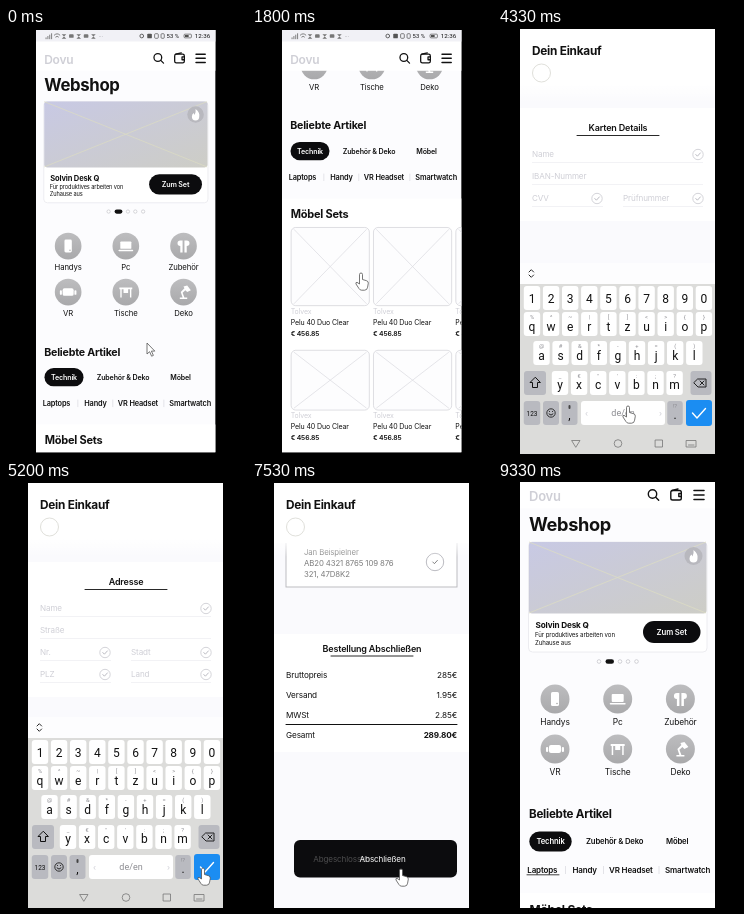
Animation of 240 by 426 pixels, one loop 9.39 s. Source, as an HTML page:

```html
<!DOCTYPE html>
<html lang="de">
<head>
<meta charset="utf-8">
<title>Webshop</title>
<style>
html, body { margin: 0; width: 100%; height: 100%; overflow: hidden; background: #000; }
svg { display: block; width: 240px; height: 426px; }
text { font-family: Inter, sans-serif; font-weight: 400; letter-spacing: -.015em; fill: #111; white-space: pre; }
.b { font-weight: 700; letter-spacing: -.02em; }
.s { font-weight: 600; letter-spacing: -.02em; }
.k { font-family: Roboto, sans-serif; letter-spacing: 0; }
.m { text-anchor: middle; }
.e { text-anchor: end; }
.w { fill: #fff; }
.g { fill: #cfcfd6; }
.d { fill: #8d8d92; }
.ln { fill: none; stroke: #111; stroke-width: 1.4; stroke-linecap: round; stroke-linejoin: round; }
.thin { fill: none; stroke: #dcdce2; stroke-width: .8; }
.ic { fill: #fff; stroke: none; }
</style>
</head>
<body>
<svg id="stage" viewBox="0 0 240 426">
  <defs>
    <clipPath id="phone"><rect x="22" y="-17.8" width="195" height="459"/></clipPath>
    <clipPath id="page"><rect x="22" y="1" width="195" height="425"/></clipPath>
    <linearGradient id="photo" x2="1" y2="1">
      <stop stop-color="#c8c9e4"/><stop offset="1" stop-color="#cdcdc6"/>
    </linearGradient>
    <linearGradient id="disc" x2="0" y2="1">
      <stop stop-color="#bdbdbf"/><stop offset="1" stop-color="#a9a9ab"/>
    </linearGradient>
    <linearGradient id="fade" x2="0" y2="1">
      <stop stop-color="#fff"/><stop offset=".75" stop-color="#fff"/>
      <stop offset="1" stop-color="#fff" stop-opacity="0"/>
    </linearGradient>
  </defs>
</svg>
<script>
const LOOP = 9390;
const stage = document.getElementById('stage');
const esc = s => s.replace(/&/g, '&amp;').replace(/</g, '&lt;');

// Drawing helpers
const T = (x, y, size, s, cls = '', more = '') =>
  `<text x="${x}" y="${y}" font-size="${size}" class="${cls}" ${more}>${esc(s)}</text>`;
const R = (x, y, w, h, fill, r = 0, more = '') =>
  `<rect x="${x}" y="${y}" width="${w}" height="${h}" rx="${r}" fill="${fill}" ${more}/>`;
const C = (x, y, r, fill, more = '') => `<circle cx="${x}" cy="${y}" r="${r}" fill="${fill}" ${more}/>`;
const P = (d, cls = 'ln', more = '') => `<path d="${d}" class="${cls}" ${more}/>`;
const G = (id, body, more = '') => `<g id="${id}" ${more}>${body}</g>`;
const at = (x, y, body) => `<g transform="translate(${x} ${y})">${body}</g>`;
const cross = (x, y, w, h) => P(`M${x} ${y}l${w} ${h}M${x} ${y + h}l${w} ${-h}`, 'thin');
const tick = (x, y, color) => P(`M${x - 2.2} ${y}l1.6 1.7 3-3.3`, 'ln', `style="stroke:${color};stroke-width:.9"`);

const statusBar = R(22, -7, 196, 13, '#f1f1f6') +
  P('M33 3v-1M35 3v-2.5M37 3v-4M39 3v-5.5M42-1q3-3 6 0M43.5 1q1.5-1.6 3 0', 'ln', 'style="stroke:#666;stroke-width:.9"') +
  [52, 60, 68, 76, 84].map((x, i) =>
    i % 2 ? R(x - 2, -2, 5, 4, '#777', 1) : P(`M${x - 2}-2h5l-2.5 2.5 2.5 2.5h-5l2.5-2.5z`, '', 'fill="#777"')).join('') +
  T(90, 2, 6, '···', 'd') +
  C(137, 0, 2, 'none', 'stroke="#555"') + R(143, -2.5, 5, 5, '#555', 1) +
  R(151, -2.5, 4, 5, 'none', 1, 'stroke="#555" stroke-width=".8"') +
  R(158, -2.5, 3.5, 5, 'none', 1, 'stroke="#555" stroke-width=".8"') +
  T(164, 2.3, 6.4, '53 %', 'k') + R(183, -2, 8, 4, 'none', 1, 'stroke="#444" stroke-width=".7"') +
  R(184, -1, 4, 2, '#444') + T(211.5, 2.3, 6.8, '12:36', 'k e');

// Home
const icons = [
  R(-4, -7, 8, 14, '#fff', 1.6) + C(2, 4.5, .8, '#aaa'),
  R(-6, -5, 12, 8, '#fff', 1) + R(-8, 4, 16, 1.6, '#fff', .8),
  P('M-1-6h-2.5a3 3 0 0 0 0 6v7H-1zM1-6h2.5a3 3 0 0 1 0 6v7H1z', 'ic'),
  R(-6, -4, 12, 8, '#fff', 2) + R(-9, -2, 2.2, 5, '#fff', 1) + R(6.8, -2, 2.2, 5, '#fff', 1),
  P('M-7-5H7v2H6v9H4.5v-9H2.5V1H-2.5v-4H-4.5v9H-6v-9H-7z', 'ic'),
  P('M-4 6h8v1.5h-8zM-1 6l-2-6 4-4-1-2 4-1 4 5-4 2-2-2-3 2.7L1 6z', 'ic')
];
const category = (name, i) => {
  const x = 57 + 62.7 * (i % 3), y = 217 + 50 * Math.floor(i / 3);
  return at(x, y, C(0, 0, 14.5, 'url(#disc)') + icons[i] + T(0, 26, 8.4, name, 'm'));
};
const article = (x, y, h, label) => R(x, y, 85, h, '#fdfdfe', 5, 'stroke="#d2d2d8" stroke-width=".8"') +
  cross(x + 3, y + 2, 79, h - 4) +
  T(x - .5, label, 7.6, 'Tolvex', 'g') + T(x - .5, label + 12, 7.6, 'Pelu 40 Duo Clear') +
  T(x - .5, label + 24, 7.4, '€ 456.85', 's');

const home = R(22, -18, 196, 460, '#fcfcfe') + G('feed',
  T(31, 48.5, 18.2, 'Webshop', 'b') +
  R(30.5, 60, 178.5, 110, '#fff', 4, 'stroke="#ececf0"') +
  R(31, 60, 177.5, 71.5, 'url(#photo)', 3) +
  P('M31 131L208 60M31 60l177 71', 'thin', 'style="stroke:#dcdcc4"') +
  C(195.5, 74, 9, '#b8b8be') +
  P('M195.5 68q5 4 4 8.5a4 4 0 0 1-8 0q0-2.5 2-4l1 2q1.6-3 1-6.5z', 'ic') +
  T(37.5, 146, 8.2, 'Solvin Desk Q', 'b') +
  T(37, 155, 6.1, 'Für produktives arbeiten von') + T(37, 163, 6.1, 'Zuhause aus') +
  R(145, 139, 57.5, 22, '#0c0c0e', 11) + T(173.7, 153, 7.8, 'Zum Set', 's w m') +
  [101, 122, 130, 138.5].map(x => C(x, 179.5, 1.8, '#fff', 'stroke="#c6c6cc" stroke-width=".8"')).join('') +
  R(107.5, 177.2, 8.5, 4.6, '#111', 2.3) +
  ['Handys', 'Pc', 'Zubehör', 'VR', 'Tische', 'Deko'].map(category).join('') +
  T(31, 336, 11.6, 'Beliebte Artikel', 'b') +
  R(31.3, 349.5, 42.4, 20, '#0c0c0e', 10) + T(52.5, 362.3, 7.7, 'Technik', 's w m') +
  T(88, 362.3, 7.7, 'Zubehör & Deko', 's') + T(168, 362.3, 7.7, 'Möbel', 's') +
  [['Laptops', 29.3], ['Handy', 74.5], ['VR Headset', 111], ['Smartwatch', 167]]
    .map(([s, x]) => T(x, 390.6, 8, s, 's')).join('') +
  P('M67.5 384v8M105.5 384v8M161 384v8', 'thin') +
  P('M29 392.8h32', 'ln', 'id="under" style="stroke-width:.8"') +
  R(22, 411, 196, 320, '#fff') +
  T(31.5, 432, 12, 'Möbel Sets', 'b') +
  [32, 121.5, 211].map(x => article(x, 442.5, 85, 536.5) + article(x, 576, 65, 649.6)).join('')
) +
  R(22, -18, 196, 44.5, '#fff') + at(0, -11.3, statusBar) +
  T(31, 18.7, 13, 'Dovu', 's g') +
  C(154.5, 12, 4.2, 'none', 'class="ln"') + P('M157.7 15.2l3 3') +
  R(172.8, 8.5, 10.5, 9.5, 'none', 1.8, 'class="ln"') + P('M174 8.5l6-1.5M183.3 11.5h-2.5v3h2.5') +
  P('M196 8.5h10M196 13h10M196 17.5h10', 'ln', 'style="stroke-width:1.6"');

// Product
const feature = (x, y) => C(x, y, 9.6, '#fff', 'stroke="#e2e2e8" stroke-width=".8"') + C(x, y, 5.5, '#cacad2') +
  R(x + 18, y - 5, 54, 10, '#cecdd5', 5);
const product = R(22, 1, 196, 423, '#fafafd') + R(22, 187, 196, 139, '#fff') +
  cross(22, 40, 196, 147) + R(22, 1, 196, 42, '#fff') + at(0, 8, statusBar) +
  P('M40 24.5l-4.5 4.5 4.5 4.5') + T(120, 35, 12, 'Produkt', 'b m') +
  P('M189.5 25.5h12.5v9h-12.5zM192.5 25.5q0-4 3.3-4t3.3 4') +
  R(168, 46, 40, 15, '#d0d0dc', 7.5) + R(176, 49.5, 25, 8, '#c3c3cb', 4, 'stroke="#f2f2f6"') +
  C(196, 169.5, 12.5, '#0c0c0e') + T(196, 172.5, 8, 'AR', 'w m') +
  T(31, 207, 7.6, 'Tolvex', 'g') +
  T(31, 223.3, 12, 'Tolvex Pelu', 'b') + T(31, 240.5, 12, '50 Duo Clear', 'b') +
  C(155, 214.5, 7.5, '#b9861a') + C(178, 214.5, 7.5, '#0c0d42') +
  C(201, 214.5, 7.5, '#e8f5fc', 'stroke="#cfdde6" stroke-width=".7"') +
  feature(40, 262) + feature(137, 262) + feature(40, 285) + feature(40, 308) +
  T(209, 295, 8.2, 'Preis', 'e') + T(209, 313, 17, '€ 285.00', 'b e') +
  R(22, 340, 196, 48, '#fff') + T(31, 358, 11.6, 'Dazu passt...', 'b') +
  [31.5, 121.5, 211].map(x => R(x, 367, 85.5, 86, '#fdfdfe', 5, 'stroke="#d2d2d8" stroke-width=".8"') +
    cross(x + 3, 369, 79, 82)).join('') +
  R(22, 387, 63, 37, '#fff') + R(85, 387, 133, 37, '#0c0c0e') + R(22, 424, 196, 2, '#000') +
  P('M22 387h63', 'ln', 'style="stroke-width:.6"') +
  T(53.5, 409, 7.5, 'Beratung', 'b m') + T(150, 409, 7.7, 'In den Warenkorb', 'w m');

// Checkout forms: x, y, hint, value, typing start, tick x
const fields = {
  card: [
    [34, 129, 'Name', 'Jan Beispielner', 4400, 200],
    [34, 151, 'IBAN-Nummer', 'AB20 4321 8765 109 876', 4540, 0],
    [34, 173, 'CVV', '321', 4700, 99],
    [125, 173, 'Prüfnummer', '47D8K2', 4800, 200]
  ],
  address: [
    [34, 129, 'Name', 'Jan Beispielner', 5270, 200],
    [34, 151, 'Straße', 'Beispielweg', 5400, 0],
    [34, 173, 'Nr.', '7b', 5530, 99],
    [125, 173, 'Stadt', 'Beispielort', 5600, 200],
    [34, 195, 'PLZ', '54321', 5730, 99],
    [125, 195, 'Land', 'Probeland', 5800, 200]
  ]
};
const checkoutHead = R(22, 1, 196, 74, 'url(#fade)') + T(34, 27, 11.8, 'Dein Einkauf', 'b') +
  C(43.5, 45, 9, '#fff', 'stroke="#dcdcd6" stroke-width=".9"');
const heading = (y, s) => T(120, y, 9, s, 's m') + P(`M79 ${y + 4.5}h82`, 'ln', 'style="stroke-width:.9"');
const form = (name, title, h) => G(name,
  R(22, 1, 196, 425, '#fafafd') + R(22, 80, 196, h, '#fff') + checkoutHead + heading(103, title) +
  fields[name].map(([x, y, , , , mark], i) =>
    P(`M${x} ${y + 5.5}H${mark === 99 ? 105 : 205}`, 'thin', 'style="stroke:#efeff3"') +
    T(x, y, 8.1, '', '', `id="${name}${i}"`) +
    (mark ? G(name + i + 'mark', C(mark, y - 2.5, 5.2, '#fff', 'stroke="#c9c9d0" stroke-width=".8"') +
      tick(mark, y - 2.5, '#b4b4bc')) : '')).join(''), 'clip-path="url(#page)"');

// Keyboard
const key = (x, y, w, fill, s = '', hint = '', drop = 6) =>
  R(x - w / 2, y - 12, w, 24, fill, 3) + T(x, y + drop, 12, s, 'k m') + T(x, y - 5, 5.8, hint, 'k m d');
const keyRow = (chars, hints, x, y, drop) =>
  [...chars].map((c, i) => key(x + 19.1 * i, y, 16.4, '#fff', c, hints[i], drop)).join('');
const GREY = '#b9bac0';
const keyboard =
  R(22, 235, 196, 21, '#fdfdfe') + P('M31 244l2.3-2.3 2.3 2.3M31 247l2.3 2.3 2.3-2.3', 'ln', 'style="stroke-width:.9"') +
  R(22, 256, 196, 170, '#dcdcda') +
  keyRow('1234567890', '', 34, 270, 4.5) +
  keyRow('qwertzuiop', '%^~|[]<>{}', 34, 296, 7) +
  keyRow('asdfghjkl', '@#&*-+=()', 43.5, 325, 7) +
  keyRow('yxcvbnm', '_€"\':;?', 62, 355) +
  key(37, 355, 22, GREY) + P('M37 349.5l-5 5h2.5v5h5v-5h2.5z', 'ln', 'style="stroke-width:1"') +
  key(203, 355, 21, GREY) + P('M200 351h8v8h-8l-4-4zM202 353l4 4M206 353l-4 4', 'ln', 'style="stroke-width:.9"') +
  key(34, 385, 16.5, GREY) + T(34, 387.5, 6.5, '123', 'k m') +
  key(53, 385, 16, GREY) + C(53, 385, 4.2, 'none', 'stroke="#222" stroke-width=".9"') +
  P('M51 386q2 2.5 4 0M51.5 383.5v.1M54.5 383.5v.1', 'ln', 'style="stroke-width:.9"') +
  key(71.5, 385, 16, GREY, ',') + R(70.5, 377, 2, 4, '#444', 1) +
  key(125, 385, 84, '#fff') + T(125, 388, 9, 'de/en', 'k m d') +
  T(87, 388, 8, '‹', 'g') + T(161, 388, 8, '›', 'g') +
  key(177, 385, 15.5, GREY, '.', '!?') +
  R(188, 372, 26, 26, '#1b8df2', 3) + P('M194.5 385l4.5 5 8.5-9.5', 'ln', 'style="stroke:#fff"') +
  P('M74 412.5h8l-4 6.5zM157.5 412h7v7h-7zM188.5 412.5h9.5v6.5h-9.5zM190.5 417h5.5', 'ln', 'style="stroke:#777;stroke-width:.8"') +
  C(120, 415.5, 3.8, 'none', 'stroke="#777" stroke-width=".8"');

// Summary
const summaryBox = (y, lines) => R(34, y, 171, 62, '#fff', 0, 'stroke="#b6b6ba" stroke-width=".9"') +
  lines.map((s, i) => T(52, y + 30 + 11 * i, 7.8, s, '', 'fill-opacity=".55"')).join('') +
  C(183, y + 37, 8.7, '#fff', 'stroke="#b4b4ba" stroke-width=".9"') + tick(183, y + 37, '#777');
const costs = [['Bruttopreis', '285€'], ['Versand', '1.95€'], ['MWSt', '2.85€'], ['Gesamt', '289.80€']];
const summary = R(22, 1, 196, 425, '#fafafd') + G('bill',
  summaryBox(-32, ['Jan Beispielner', 'Beispielweg 7b', '54321 Beispielort']) +
  summaryBox(43, ['Jan Beispielner', 'AB20 4321 8765 109 876', '321, 47D8K2']) +
  R(22, 152, 196, 118, '#fff') + heading(169.5, 'Bestellung Abschließen') +
  costs.map(([a, b], i) => T(34, 196 + 20 * i, 8.2, a) +
    T(205, 196 + 20 * i, 8.2, b, i > 2 ? 'b e' : 'e')).join('') +
  P('M34 242.5h171', 'ln', 'style="stroke-width:1"') +
  R(42, 358, 163, 37.5, '#0c0c0e', 6) +
  T(0, 380, 8.1, 'Abgeschlossen', 'w m', 'id="done"') + T(0, 380, 8.1, 'Abschließen', 'w m', 'id="order"')
) + R(22, 1, 196, 60, '#fff') + checkoutHead;

const outline = 'fill="#fff" stroke="#555" stroke-width=".8" stroke-linejoin="round"';
stage.insertAdjacentHTML('beforeend',
  G('home', home, 'clip-path="url(#phone)"') +
  G('product', product, 'clip-path="url(#page)"') +
  form('card', 'Karten Details', 113) + form('address', 'Adresse', 135) +
  G('keys', keyboard, 'clip-path="url(#page)"') +
  G('summary', summary, 'clip-path="url(#page)"') +
  G('cursor',
    P('M0 0v11l2.6-2.3 2 4.5 1.8-.8-2-4.3h3.4z', '', `id="arrow" ${outline}`) +
    P('M-1.5 1.5a1.5 1.5 0 0 1 3 0v5l4 1.2q2 .6 1.8 2.5l-.7 4q-.4 3-3 3h-3q-1.6 0-2.6-1.6l-3-4.6q-.6-1.7 1-1.7l2.5 1.7z', '', `id="hand" ${outline}`)));

const el = {};
stage.querySelectorAll('[id]').forEach(n => el[n.id] = n);
const show = (id, on) => el[id].style.display = on ? '' : 'none';
const move = (id, x, y, s = 1) => el[id].setAttribute('transform', `translate(${x} ${y}) scale(${s})`);

// Eased value through [time, value...] points
const ease = u => u * u * (3 - 2 * u);
function track(points, t) {
  const i = points.findIndex(p => p[0] > t);
  if (i === 0) return points[0].slice(1);
  if (i < 0) return points[points.length - 1].slice(1);
  const a = points[i - 1], b = points[i], u = ease((t - a[0]) / (b[0] - a[0]));
  return a.slice(1).map((v, k) => v + (b[k + 1] - v) * u);
}
const pointer = [
  [0, 141, 315], [1100, 141, 315], [1700, 109, 245], [2070, 109, 245], [2930, 156, 406], [3200, 156, 406],
  [3530, 213, 24], [3730, 200, 26], [4270, 130, 378], [4450, 130, 378], [4870, 197, 386], [6270, 197, 386],
  [6730, 160, 330], [7330, 149, 387]
];
const feedScroll = [[200, 0], [1330, -245.7]];
const billScroll = [[6400, 150], [7130, 0]];

function fillForm(name, t) {
  fields[name].forEach(([, , hint, value, start, mark], i) => {
    const n = Math.floor(value.length * Math.min(1, Math.max(0, (t - start) / 130)));
    const text = el[name + i];
    text.textContent = n ? value.slice(0, n) : hint;
    text.setAttribute('class', n ? '' : 'g');
    if (!mark) return;
    const [disc, check] = el[name + i + 'mark'].children;
    const full = n === value.length;
    disc.setAttribute('fill', full ? '#111' : '#fff');
    disc.setAttribute('stroke', full ? '#111' : '#c9c9d0');
    check.style.stroke = full ? '#fff' : '#b4b4bc';
  });
}

const scenes = [[0, 'home'], [1870, 'product'], [3730, 'card'], [5130, 'address'], [6270, 'summary'], [8330, 'home']];

function draw(t) {
  const scene = scenes.filter(s => s[0] <= t).pop()[1];
  for (const [, id] of scenes) show(id, id === scene);
  show('keys', scene === 'card' || scene === 'address');

  const close = t > 8000;
  close ? move('home', 0, 0) : move('home', 9.7, 18.4, .92);
  move('feed', 0, close ? 0 : track(feedScroll, t)[0]);
  show('under', close);

  fillForm('card', t);
  fillForm('address', t);

  move('bill', 0, track(billScroll, t)[0]);
  const [u] = track([[7400, 0], [7870, 1]], t);
  move('order', 123.5 + 38 * u, 0);
  move('done', 82 + 41.5 * u, 0);
  el.order.style.opacity = Math.min(1, 1.25 * (1 - u));
  el.done.style.opacity = Math.min(1, u * 1.4);

  move('cursor', ...track(pointer, t));
  show('cursor', t < 8330);
  show('arrow', t < 1500);
  show('hand', t >= 1500);
}

// 15 steps a second, each rounded to 10 ms
const stepStart = k => Math.round(k / .15) * 10;
const origin = performance.now();
let last = -1;
function run() {
  const t = (performance.now() - origin) % LOOP;
  let k = Math.floor(t * .015 + .06);
  if (stepStart(k) > t) k--;
  if (k !== last) draw(stepStart(last = k));
  requestAnimationFrame(run);
}
run();
</script>
</body>
</html>
```
